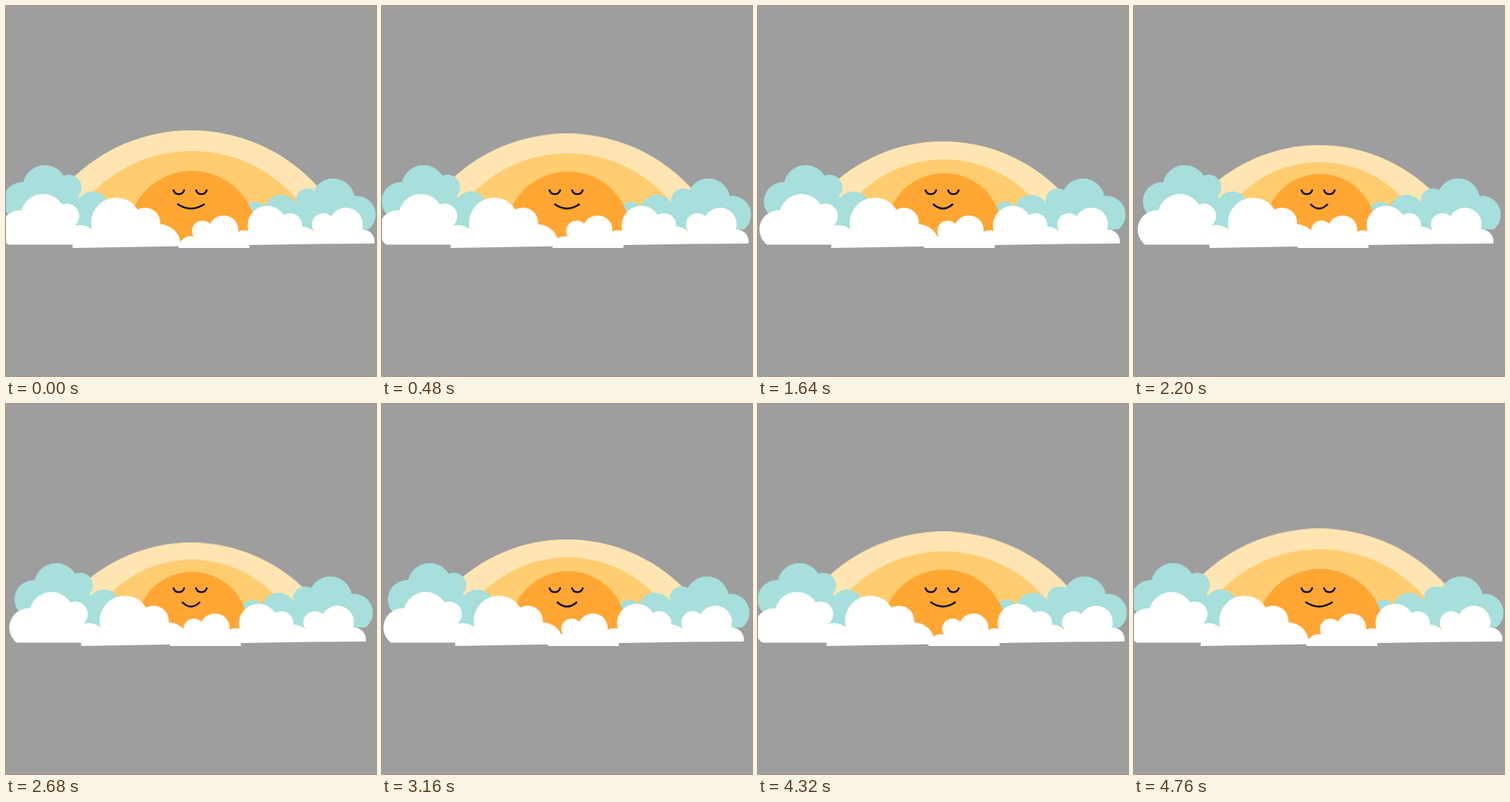
Recreate the animation shown at these times as an HTML page without scripts. Size 500 by 500 pixels, loop 4.84 s.

```html
<!DOCTYPE html>
<html lang="en">
<head>
<meta charset="utf-8">
<title>Sleepy sun</title>
<style>
  html, body { margin: 0; width: 100%; height: 100%; overflow: hidden; background: #9e9e9e; }
  svg { display: block; width: 100vw; height: 100vh; }

  .move {
    --x: 0px; --y: 0px; --sx: 1; --sy: 1;
    transform-box: fill-box;
    transform-origin: 50% 0;
    animation: breathe 4840ms steps(60) infinite;
  }
  /* 2400 ms in, 2400 ms out, then one 40 ms rest */
  @keyframes breathe {
    0%, 99.174%, 100% { transform: none; }
    49.587% { transform: translate(var(--x), var(--y)) scale(var(--sx), var(--sy)); }
  }

  .outer { --y: 21.8px; --sx: .943; --sy: .943; fill: #ffe5b2; }
  .middle { --y: 16.4px; --sx: .803; --sy: .803; fill: #ffcc70; }
  .sun { --y: 4.4px; --sx: .844; --sy: .844; fill: #ffa633; }
  .smile { --sx: .606; }
  .face { fill: none; stroke: #0d0d0d; stroke-width: 2.5; }
  .face path { vector-effect: non-scaling-stroke; }

  .teal { fill: #a6dfdb; }
  .white { fill: #fff; }
  .teal.left { --x: 17.4px; }
  .teal.right { --x: -4.2px; }
  .white.left { --x: 13px; }
  .white.right { --x: -13.3px; }
</style>
</head>
<body>
<svg viewBox="0 0 500 500">
  <defs>
    <clipPath id="horizon"><path d="M0 0H500V320H0z"/></clipPath>
    <clipPath id="tealBase"><path d="M300 200H520V302H300z"/></clipPath>
    <clipPath id="leftBase"><path d="M-40 200H240V324.4L90 327V322.5H-40z"/></clipPath>
    <clipPath id="rightBase"><path d="M233 200H520V321H498L423 321.5 329 323V327H233z"/></clipPath>
  </defs>

  <g clip-path="url(#horizon)">
    <circle class="move outer" cx="250" cy="399" r="231"/>
    <circle class="move middle" cx="251" cy="384" r="188"/>
  </g>

  <g class="move teal left">
    <circle cx="22" cy="264" r="26"/>
    <circle cx="52.5" cy="245" r="30"/>
    <circle cx="85" cy="245" r="17"/>
    <circle cx="117" cy="272" r="21.5"/>
    <path d="M22 262L52 250H85L105 262 117 270V300H22z"/>
  </g>

  <g class="move teal right">
    <g clip-path="url(#tealBase)">
      <circle cx="337" cy="281" r="16.5"/>
      <circle cx="372" cy="278" r="23"/>
      <circle cx="408" cy="263" r="16.5"/>
      <circle cx="442" cy="262.5" r="29.5"/>
      <circle cx="474" cy="282" r="25.5"/>
      <path d="M337 280L372 270H408L442 262 474 275V310H337z"/>
    </g>
  </g>

  <g clip-path="url(#horizon)">
    <circle class="move sun" cx="251.5" cy="310.3" r="87.5"/>
  </g>

  <g class="face">
    <path d="M226 248C228 256.3 239 256.3 241 248"/>
    <path d="M256.500 248C258.500 256.300 269.500 256.300 271.500 248"/>
    <path class="move smile" d="M231.500 267.500Q250 280 268.500 267.500"/>
  </g>

  <g class="move white left">
    <g clip-path="url(#leftBase)">
      <circle cx="19" cy="302" r="26"/>
      <circle cx="50" cy="284" r="30"/>
      <circle cx="82" cy="284" r="17"/>
      <circle cx="100" cy="320" r="24"/>
      <circle cx="149" cy="293" r="34"/>
      <circle cx="188" cy="293" r="20.5"/>
      <circle cx="208" cy="323" r="28"/>
      <path d="M19 295H85L100 300 205 310V330H19z"/>
    </g>
  </g>

  <g class="move white right">
    <g clip-path="url(#rightBase)">
      <circle cx="250" cy="328" r="17"/>
      <circle cx="265.500" cy="304" r="14"/>
      <circle cx="294" cy="303" r="20"/>
      <circle cx="322" cy="318" r="15"/>
      <circle cx="353" cy="296.500" r="26.500"/>
      <circle cx="384" cy="296" r="16"/>
      <circle cx="400" cy="320" r="22"/>
      <circle cx="429" cy="295.500" r="15.500"/>
      <circle cx="459.500" cy="295" r="22.500"/>
      <circle cx="482" cy="318" r="16"/>
      <path d="M250 315L265 304H300L322 312H353L384 300 400 305H429V300H459L483 308V330H250z"/>
    </g>
  </g>
</svg>
</body>
</html>
```
